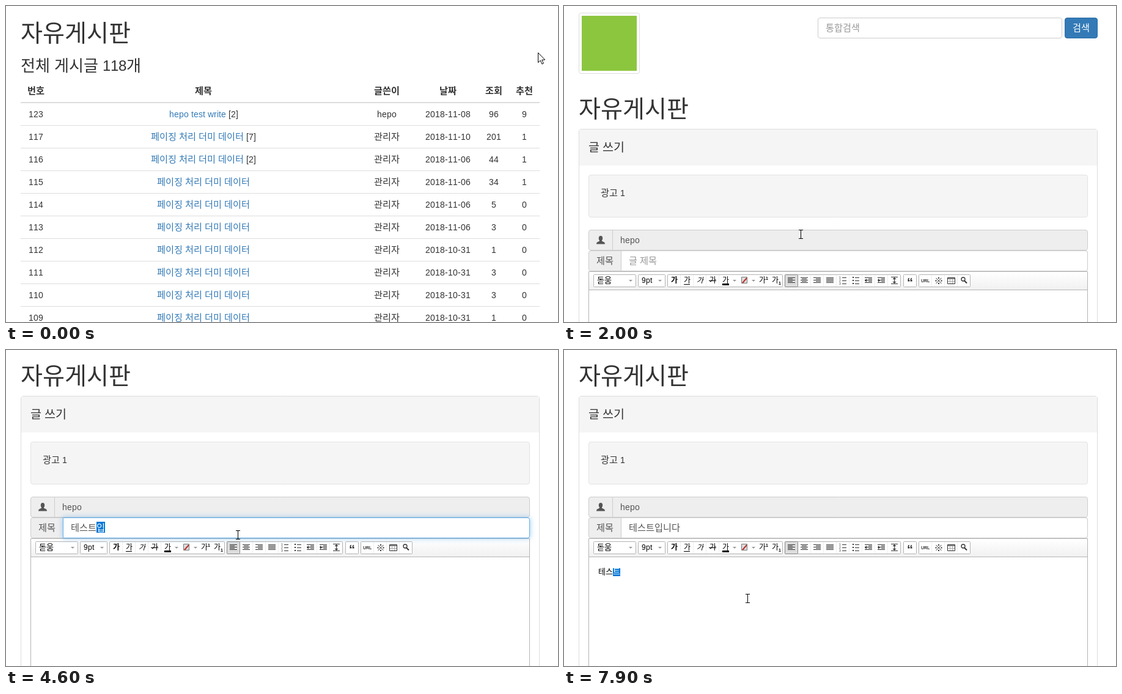
Write an HTML page with a canvas that moves like this. It is 903x517 px and loops after 8 s.

```html
<!DOCTYPE html>
<html lang="ko">
<head>
<meta charset="utf-8">
<style>
html, body { margin: 0; width: 903px; height: 517px; overflow: hidden; background: #fff; }
canvas { display: block; }
</style>
</head>
<body>
<canvas id="stage" width="903" height="517"></canvas>
<script>
const g = document.getElementById('stage').getContext('2d');
const LATIN = '"Liberation Sans", Arial, sans-serif';
const HANGUL = '"Noto Sans CJK KR", "Noto Sans CJK", sans-serif';
const INK = '#333', LINK = '#337ab7', GREY = '#555', LINE = '#ccc', EDGE = '#b4b4b4';
const USER = 'hepo', ADMIN = '관리자';
const SWITCH = 1500, ROW = 37, TOP = 158;

// board rows, newest first
const views = [96, 201, 44, 34, 5, 3, 1, 3, 3, 1];
const votes = [9, 1, 1, 1], replies = [2, 7, 2], days = ['11-08', '11-10'];
const rows = views.map((seen, k) => ({
  title: k ? '페이징 처리 더미 데이터' : USER + ' test write',
  note: replies[k] ? ` [${replies[k]}]` : '',
  cells: [k ? 118 - k : 123, '', k ? ADMIN : USER,
    '2018-' + (days[k] || (k < 6 ? '11-06' : '10-31')), seen, votes[k] || 0]
}));
const heads = ['번호', '제목', '글쓴이', '날짜', '조회', '추천'];
const cols = [48.5, 323, 622.5, 722.5, 797.5, 847.5];

// pointer stops: time, x, y
const path = [
  [0, 871, 76], [500, 800, 155], [600, 781, 233], [1000, 848, 388], [1200, 848, 388],
  [1400, 702, 345], [2000, 387, 373], [2400, 365, 336], [2700, 365, 336], [2900, 379, 302],
  [6400, 379, 302], [6700, 310, 488], [7000, 300, 406]
];

const unit = v => Math.min(1, Math.max(0, v));
const ease = v => (v = unit(v)) * v * (3 - 2 * v);
const listScroll = t => Math.round(176 * ease((t - 100) / 500));
const formScroll = t => Math.round(126 * ease((t - 2000) / 430));
const glow = t => unit((t - 2700) / 200) - unit((t - 6500) / 200);

function pointer(t) {
  const n = path.findIndex(p => p[0] > t);
  if (n < 0) return path.at(-1).slice(1);
  const a = path[n - 1], b = path[n], u = (t - a[0]) / (b[0] - a[0]);
  return [1, 2].map(i => a[i] + (b[i] - a[i]) * u);
}

// Every stage of composing Korean text: the next consonant first joins the open syllable
const LEADS = 'ㄱㄲㄴㄷㄸㄹㅁㅂㅃㅅㅆㅇㅈㅉㅊㅋㅌㅍㅎ';
const TAILS = ' ㄱㄲㄳㄴㄵㄶㄷㄹㄺㄻㄼㄽㄾㄿㅀㅁㅂㅄㅅㅆㅇㅈㅊㅋㅌㅍㅎ';
const tailOf = ch => (ch.charCodeAt(0) - 0xac00) % 28;
const shift = (ch, n) => String.fromCharCode(ch.charCodeAt(0) + n);
function compose(word) {
  const out = [];
  let done = '';
  for (const ch of word) {
    const lead = LEADS[Math.floor((ch.charCodeAt(0) - 0xac00) / 588)];
    const last = done.slice(-1), tail = tailOf(ch);
    out.push(last && !tailOf(last)
      ? done.slice(0, -1) + shift(last, TAILS.indexOf(lead)) : done + lead);
    out.push(done + shift(ch, -tail));
    if (tail) out.push(done + ch);
    done += ch;
  }
  return out;
}
const WORD = '테스트입니다', stages = compose(WORD);

// bursts of keys: start time, first stage, last stage; one key per 100 ms
const titleBursts = [[3600, 0, 3], [4100, 5, 7], [4600, 8, 8], [5300, 5, 5], [5800, 7, 10], [6300, 12, 12]];
const bodyBursts = [[7300, 0, 0], [7500, 1, 5]];
function typing(bursts, t) {
  const b = bursts.findLast(b => b[0] <= t);
  return b ? stages[Math.min(b[2], b[1] + (t - b[0]) / 100)] : '';
}
function titleState(t) {
  if (t < 3600) return [t >= 3000 && t < 3400 ? 'x' : '', false];
  if (t >= 4900 && t < 5300) return [WORD.slice(0, t < 5100 ? 3 : 2), false];
  return [typing(titleBursts, t), t < 6500];
}

// Hangul is enlarged so that one syllable is one em wide; advances are whole pixels
function walk(s, size, style, draw) {
  let x = 0;
  for (const ch of String(s)) {
    const ko = /[ㄱ-힣]/.test(ch);
    g.font = `${style} ${ko ? size / .92 : size}px ${ko ? HANGUL : LATIN}`;
    if (draw) draw(ch, x, ko ? Math.round(size / 30) : 0);
    x += Math.round(g.measureText(ch).width);
  }
  return x;
}
const width = (s, size = 14, style = '') => walk(s, size, style);
function text(s, x, y, color = INK, size = 14, style = size > 16 ? '300' : '') {
  g.fillStyle = color;
  return x + walk(s, size, style, (ch, dx, dy) => g.fillText(ch, x + dx, y + dy));
}
function centred(s, x, y, color, size, style) {
  text(s, Math.round(x - width(s, size, style) / 2), y, color, size, style);
}

function fill(x, y, w, h, color) {
  g.fillStyle = color;
  g.fillRect(x, y, w, h);
}
function box(x, y, w, h, color, border, r = 0) {
  g.beginPath();
  g.roundRect(x + .5, y + .5, w - 1, h - 1, r);
  g.fillStyle = color;
  g.fill();
  g.strokeStyle = border;
  g.lineWidth = 1;
  g.stroke();
}
function trace(points) {
  g.beginPath();
  points.forEach(([x, y]) => g.lineTo(x, y));
}
function stroke(points, color = INK, w = 1) {
  trace(points);
  g.strokeStyle = color;
  g.lineWidth = w;
  g.stroke();
}
function shape(points, color = INK) {
  trace(points);
  g.fillStyle = color;
  g.fill();
}
// triangle with its tip at x, y, opening along dx, dy
function tip(x, y, dx, dy, color) {
  shape([[x, y], [x + dx + dy, y + dy + dx], [x + dx - dy, y + dy - dx]], color);
}
function button(s, x, y, w, dark) {
  box(x, y, w, 34, dark ? '#286090' : LINK, dark ? '#204d74' : '#2e6da4', 3.5);
  centred(s, x + w / 2, y + 22, '#fff');
}

function rowAt(t) {
  if (t < 0) return -1;
  const [x, y] = pointer(t);
  return x < 873 ? Math.floor((y + listScroll(t) - TOP) / ROW) : -1;
}

function drawList(t) {
  text('자유게시판', 24, 57, INK, 36);
  text('전체 게시글 118개', 24, 106, INK, 24);
  heads.forEach((s, i) => centred(s, cols[i], 144, INK, 14, 'bold'));
  fill(24, 157, 849, 2, '#ddd');
  // the row just left stays lit while the next one fades in
  const now = rowAt(t), last = rowAt(t - 100);
  rows.forEach(({ title, note, cells }, k) => {
    const y = TOP + ROW * k;
    if (k === last || k === now) fill(24, y + 1, 849, 36, k === last ? '#f5f5f5' : '#fafafa');
    if (k) fill(24, y, 849, 1, '#ddd');
    cells.forEach((s, i) => centred(s, cols[i], y + 24));
    const x = Math.round(cols[1] - width(title + note) / 2);
    text(note, text(title, x, y + 24, LINK), y + 24);
  });
  button('글쓰기', 820, 548, 68, t >= 1000 && t <= 1200);

  box(259, 602, 378, 34, '#fff', '#ddd', 3.5);
  for (let i = 1; i <= 10; i++) {
    const x = 226 + 33 * i, w = i < 10 ? 33 : 42;
    if (i < 11) fill(x + w - (i > 9 ? 4 : 0), 602, 1, 34, '#ddd');
    centred(i, x + w / 2, 624, LINK);
  }
  stroke([[614, 613], [619.5, 618.5], [614, 624]], LINK, 2);
  fill(0, 661, 903, 200, GREY);
  centred('광고안내 | 이용약관 | 개인정보처리방침', 594.5, 690, '#fff');
}

// five text lines, every second one running from a to b
function bars(x, a, b) {
  for (let i = 0; i < 5; i++) {
    const [l, r] = i % 2 ? [a, b] : [-6, 6];
    fill(x + l, 444 + 2 * i, r - l, 1, INK);
  }
}

function drawToolbar() {
  const shade = g.createLinearGradient(0, 435, 0, 464);
  shade.addColorStop(0, '#fff');
  shade.addColorStop(1, '#f1f1f1');
  box(40, 434, 817, 400, '#fff', EDGE);
  fill(41, 435, 815, 29, shade);
  fill(41, 464, 815, 1, EDGE);
  // left, right, dividers
  [[48, 118, 0], [121, 166, 0], [169, 358, 4], [361, 551, 8], [555, 577, 0], [580, 665, 3]]
    .forEach(([a, b, n]) => {
      box(a, 439, b - a, 21, '#fff', EDGE, 1);
      for (let i = 1; i <= n; i++) fill(a + 21 * i, 440, 1, 19, '#eee');
    });
  text('돋움', 54, 453, '#000', 12);
  text('9pt', 127, 453, '#000', 12);
  [109, 157, 279, 310].forEach(x => tip(x, 451, 0, -3, '#999'));

  ['bold', '', 'italic', '', ''].forEach((style, i) =>
    centred('가', 180 + 21 * i, 453, '#000', 11, style));
  fill(196, 455, 10, 1, '#000');
  fill(237, 449, 12, 1, '#000');
  fill(259, 454, 11, 3, '#000');
  box(290, 443, 10, 11, '#ddd', '#777');
  stroke([[292, 453], [299, 445]], '#b33', 2);
  for (let i = 0; i < 2; i++) {
    centred('가', 324 + 21 * i, 453, '#000', 11);
    text(1, 330 + 21 * i, 448 + 8 * i, '#000', 7, 'bold');
  }

  box(361, 439, 22, 21, '#ddd', '#888', 1);
  [[-6, 2], [-4, 4], [-2, 6], [-6, 6]].forEach(([a, b], i) => bars(372 + 21 * i, a, b));
  for (let i = 0; i < 3; i++) {
    const y = 444 + 5 * i;
    fill(455, y, 7, 1, INK);
    text(i + 1, 450, y + 2, INK, 5);
    fill(476, y, 7, 1, INK);
    fill(472, y - 1, 2, 2, INK);
  }
  [498, 519].forEach(x => bars(x, 0, 6));
  tip(492, 449, 3, 0);
  tip(517, 449, -3, 0);
  [443, 454].forEach(y => fill(535, y, 11, 1, INK));
  fill(540, 445, 1, 8, INK);
  tip(540.5, 444, 0, 3);
  tip(540.5, 454, 0, -3);
  centred('“', 566, 459, INK, 20, 'bold');
  centred('URL', 591, 452, INK, 7, 'bold');
  [-4.5, 4.5].forEach(d => {
    stroke([[613 - d, 445], [613 + d, 454]]);
    fill(612 + d, 448.5, 2, 2, INK);
    fill(612, 448.5 + d, 2, 2, INK);
  });
  box(627, 444, 13, 11, '#fff', INK);
  fill(628, 445, 11, 2, '#888');
  [631, 635].forEach(x => fill(x, 447, 1, 7, '#aaa'));
  fill(628, 450, 11, 1, '#aaa');
  g.beginPath();
  g.arc(653, 447, 3, 0, 7);
  g.lineWidth = 1.3;
  g.strokeStyle = INK;
  g.stroke();
  stroke([[655, 449.5], [659, 453.5]], INK, 2);
}

// text with the open syllable highlighted; returns its right end
function typed(s, composing, x, y, size, color) {
  const end = text(s, x, y, color, size);
  if (composing && s) {
    fill(end - size, y - size - 1 + (size < 14 ? 3 : 0), size, size < 14 ? 13 : 18, '#0078d7');
    text(s.slice(-1), end - size, y, '#fff', size);
  }
  return end;
}

function drawForm(t) {
  box(24, 11, 100, 100, '#fff', '#ddd', 3.5);
  fill(29, 16, 90, 90, '#8cc63f');
  box(415, 19, 400, 34, '#fff', LINE, 3.5);
  text('통합검색', 428, 41, '#999');
  button('검색', 819, 19, 54);

  text('자유게시판', 24, 181, INK, 36);
  box(24, 201, 849, 700, '#fff', '#ddd', 3.5);
  fill(25, 202, 847, 59, '#f5f5f5');
  text('글 쓰기', 40, 237, INK, 18);
  box(40, 276, 817, 70, '#f5f5f5', '#e3e3e3', 3.5);
  text('광고 1', 60, 311);

  box(40, 366, 817, 34, '#eee', LINE, 3.5);
  fill(79, 367, 1, 32, LINE);
  g.beginPath();
  g.ellipse(60, 380, 3.2, 4, 0, 0, 7);
  g.fillStyle = GREY;
  g.fill();
  shape([[58, 382], [62, 382], [62, 384.5], [66.5, 387], [67, 389.5], [53, 389.5], [53.5, 387], [58, 384.5]], GREY);
  text(USER, 92, 388, GREY);

  drawToolbar();

  box(40, 400, 817, 34, '#eee', LINE, 3.5);
  text('제목', 53, 422, GREY);
  const field = [93, 400, 764, 34, '#fff'], corners = [0, 3.5, 3.5, 0], lit = glow(t);
  g.shadowColor = `rgba(102,175,233,${.6 * lit})`;
  g.shadowBlur = 8;
  box(...field, LINE, corners);
  g.shadowColor = 'transparent';
  g.globalAlpha = lit;
  box(...field, '#66afe9', corners);
  g.globalAlpha = 1;

  const [title, composing] = titleState(t);
  const end = typed(title, composing, 106, 422, 14, GREY);
  if (!title) text('글 제목', 106, 422, '#999');
  const blink = t >= 3200 && t < 3400;
  if (t >= 2800 && t < 6600 && !composing && !blink) fill(end, 409, 1, 16, '#000');

  const body = typing(bodyBursts, t);
  typed(body, true, 56, 493, 12, '#000');
  if (t >= 6700 && !body) fill(56, 483, 1, 13, '#000');
}

function drawPointer(x, y, beam) {
  g.save();
  g.translate(Math.round(x), Math.round(y));
  if (beam) {
    fill(0, -7, 1, 15, '#000');
    [-7, 7].forEach(v => [-3, 1].forEach(u => fill(u, v, 3, 1, '#000')));
  } else {
    const arrow = [[0, 0], [0, 16], [3.7, 12.6], [6.4, 18.5], [8.8, 17.4], [6.2, 11.7], [11.2, 11.5], [0, 0]];
    g.translate(-.5, .5);
    shape(arrow, '#fff');
    stroke(arrow, '#000');
  }
  g.restore();
}

function draw() {
  const t = Math.floor(performance.now() % 8000 / 100) * 100;
  const onForm = t >= SWITCH;
  const scroll = onForm ? formScroll(t) : listScroll(t);
  fill(0, 0, 903, 517, '#fff');
  g.save();
  g.translate(0, -scroll);
  (onForm ? drawForm : drawList)(t);
  g.restore();
  const [x, y] = pointer(t), pageY = y + scroll;
  drawPointer(x, y, onForm && (pageY > 465 || pageY > 366 && pageY < 434));
  requestAnimationFrame(draw);
}
draw();
</script>
</body>
</html>
```
